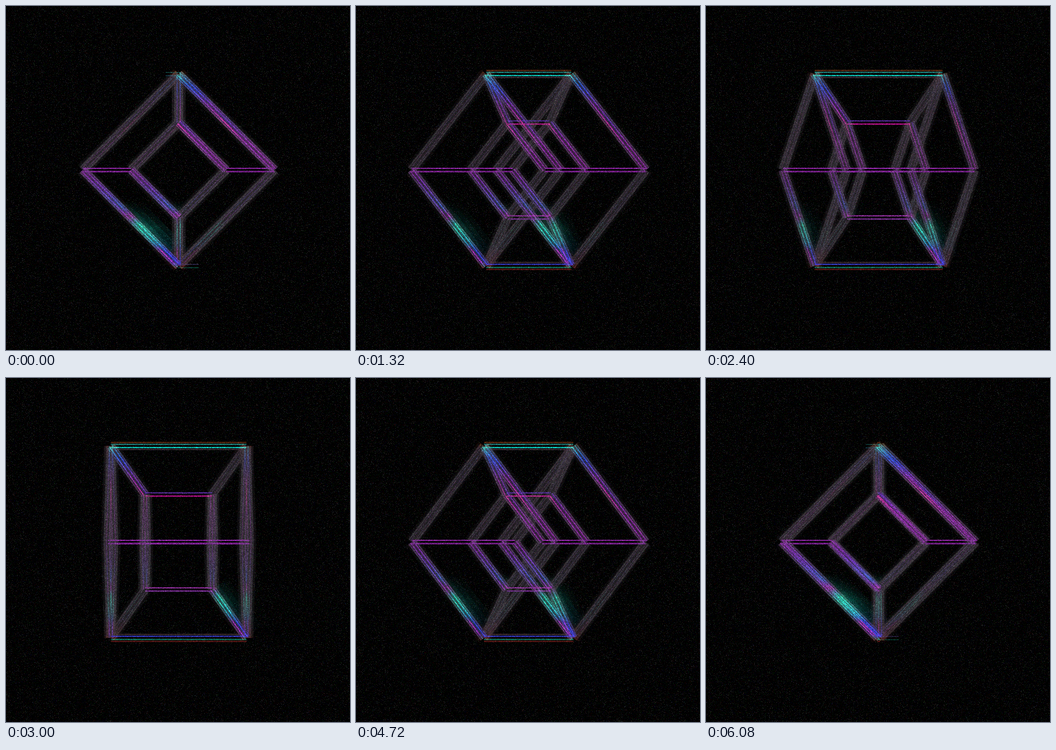
These frames come from a looping animation (500x500 px, 6.12 s). An HTML page with a canvas:

```html
<!DOCTYPE html>
<html>
<head>
<meta charset="utf-8">
<style>
  html, body { margin: 0; width: 100%; height: 100%; overflow: hidden; background: #000; }
  canvas { display: block; width: 500px; height: 500px; }
</style>
</head>
<body>
<canvas id="stage" width="500" height="500"></canvas>
<script>
const SIZE = 500, LOOP = 6120, STEP = 40;
const CX = 251, CY = 238.3, SCALE = 98.6, FAR = 0.495;
const ctx = document.getElementById('stage').getContext('2d', { willReadFrequently: true });

// Colours depend on the height on the stage.
function gradient(stops) {
  const g = ctx.createLinearGradient(0, 0, 0, SIZE);
  for (const [y, color] of stops) g.addColorStop(y / SIZE, color);
  return g;
}
const upper = gradient([
  [97, '#1f8f88'], [118, '#2c48d8'], [145, '#7a2cac'], [166, '#5a2ca8'], [200, '#8a28a4'],
  [236, '#7c1e90'], [270, '#6a38b8'], [292, '#4060c0'], [305, '#a02ca8'], [318, '#18d8b8'],
  [340, '#18b8c8'], [356, '#3040e0'], [375, '#3040e8'], [384, '#c01048']]);
const lower = gradient([
  [101, '#08c8b8'], [116, '#3058d8'], [145, '#8a2ca8'], [171, '#c00c90'], [200, '#8a28a4'],
  [240, '#7c1e90'], [280, '#5a48b8'], [309, '#84289c'], [326, '#18d0b0'], [346, '#2090c0'],
  [356, '#b010a8'], [372, '#a020c0'], [380, '#088868']]);
const rim = gradient([
  [93, '#6a2c0c'], [102, '#40303a'], [125, '#3a343c'], [350, '#3a343c'], [374, '#402c30'], [384, '#6a1814']]);
const haze = gradient([[282, '#000'], [322, '#0a7a6c'], [350, '#023848'], [366, '#000']]);

// Sixteen corners of a tesseract; edges join corners that differ in one bit.
const sign = (n, bit) => n >> bit & 1 ? 1 : -1;
const edges = [];
for (let n = 0; n < 16; n++)
  for (let bit = 0; bit < 4; bit++)
    if (!(n >> bit & 1)) edges.push([n, n | 1 << bit]);

function project(n, angle) {
  const a = sign(n, 0), b = sign(n, 1), w = sign(n, 2);
  const k = SCALE * (sign(n, 3) > 0 ? 1 : FAR);
  const x = (a - b) * Math.SQRT1_2 * Math.cos(angle) - w * Math.sin(angle);
  return [CX + k * x, CY + k * (a + b) * Math.SQRT1_2];
}

function line(x1, y1, x2, y2, style, width, alpha) {
  ctx.globalAlpha = Math.max(0, Math.min(1, alpha));
  ctx.strokeStyle = style;
  ctx.lineWidth = width;
  ctx.beginPath();
  ctx.moveTo(x1, y1);
  ctx.lineTo(x2, y2);
  ctx.stroke();
}

function drawEdge(p, q) {
  if (p[0] > q[0]) [p, q] = [q, p];
  const [x1, y1] = p, [x2, y2] = q;
  const len = Math.hypot(x2 - x1, y2 - y1);
  if (len < 0.5) return;
  const dx = (x2 - x1) / len, dy = (y2 - y1) / len;
  const steep = 1 - dx * dx, slant = 2 * dx * dy;
  const falling = Math.max(0, slant);
  const light = 0.3 + 0.7 * dx * dx + 0.5 * slant;
  const shifted = (d, style, width, alpha) =>
    line(x1 + dy * d, y1 - dx * d, x2 + dy * d, y2 - dx * d, style, width, alpha);

  // Soft light on the upper right side of falling edges.
  for (const width of [6, 12, 20, 28]) shifted(width / 2, haze, width, 2.4 * falling / width);
  for (const width of [8, 14, 20]) shifted(0, rim, width, 4.5 * steep / width);
  shifted(0, upper, 11, 0.25 * falling);
  for (const side of [1, -1]) {
    const color = side > 0 ? upper : lower;
    shifted(side * 5, rim, 2, Math.abs(y1 - CY) > 120 || steep > 0.05 ? 0.8 : 0);
    shifted(side * 5.4, color, 1, 0.55 * falling);
    shifted(side * 2.3, rim, 1.2, 0.9 * steep);
    shifted(side * 2.3, color, 1.6, light);
  }
}

// Short sideways streaks where the top and bottom edges shrink to a point.
function streaks(angle) {
  const alpha = Math.max(0, 1 - Math.abs(Math.sin(angle)) * 8);
  if (!alpha) return;
  for (const d of [-2.4, 2.4]) {
    line(232, 99 + d, 254, 99 + d, upper, 1, 0.6 * alpha);
    line(250, 378 + d, 280, 378 + d, lower, 1, 0.6 * alpha);
  }
}

const speck = Array.from({ length: 256 }, (_, i) => 52 * (i / 255) ** 14);
function grain(seed) {
  const image = ctx.getImageData(0, 0, SIZE, SIZE), px = image.data;
  let s = Math.imul(seed + 1, 2654435761);
  const next = () => (s = Math.imul(s, 1664525) + 1013904223 | 0) >>> 24;
  for (let i = 0; i < px.length; i += 4) {
    const gain = 0.7 + next() / 460, dust = speck[next()];
    for (let c = 0; c < 3; c++) px[i + c] = px[i + c] * gain + dust * 0.6 + speck[next()] * 0.4;
  }
  ctx.putImageData(image, 0, 0);
}

function draw(frame) {
  const angle = Math.PI * frame * STEP / LOOP;
  ctx.globalCompositeOperation = 'source-over';
  ctx.globalAlpha = 1;
  ctx.fillStyle = '#000';
  ctx.fillRect(0, 0, SIZE, SIZE);
  ctx.globalCompositeOperation = 'lighten';
  for (const [a, b] of edges) drawEdge(project(a, angle), project(b, angle));
  streaks(angle);
  grain(frame);
}

const start = performance.now();
let shown = -1;
function tick() {
  const frame = Math.floor((performance.now() - start) % LOOP / STEP);
  if (frame !== shown) draw(shown = frame);
  requestAnimationFrame(tick);
}
tick();
</script>
</body>
</html>
```
